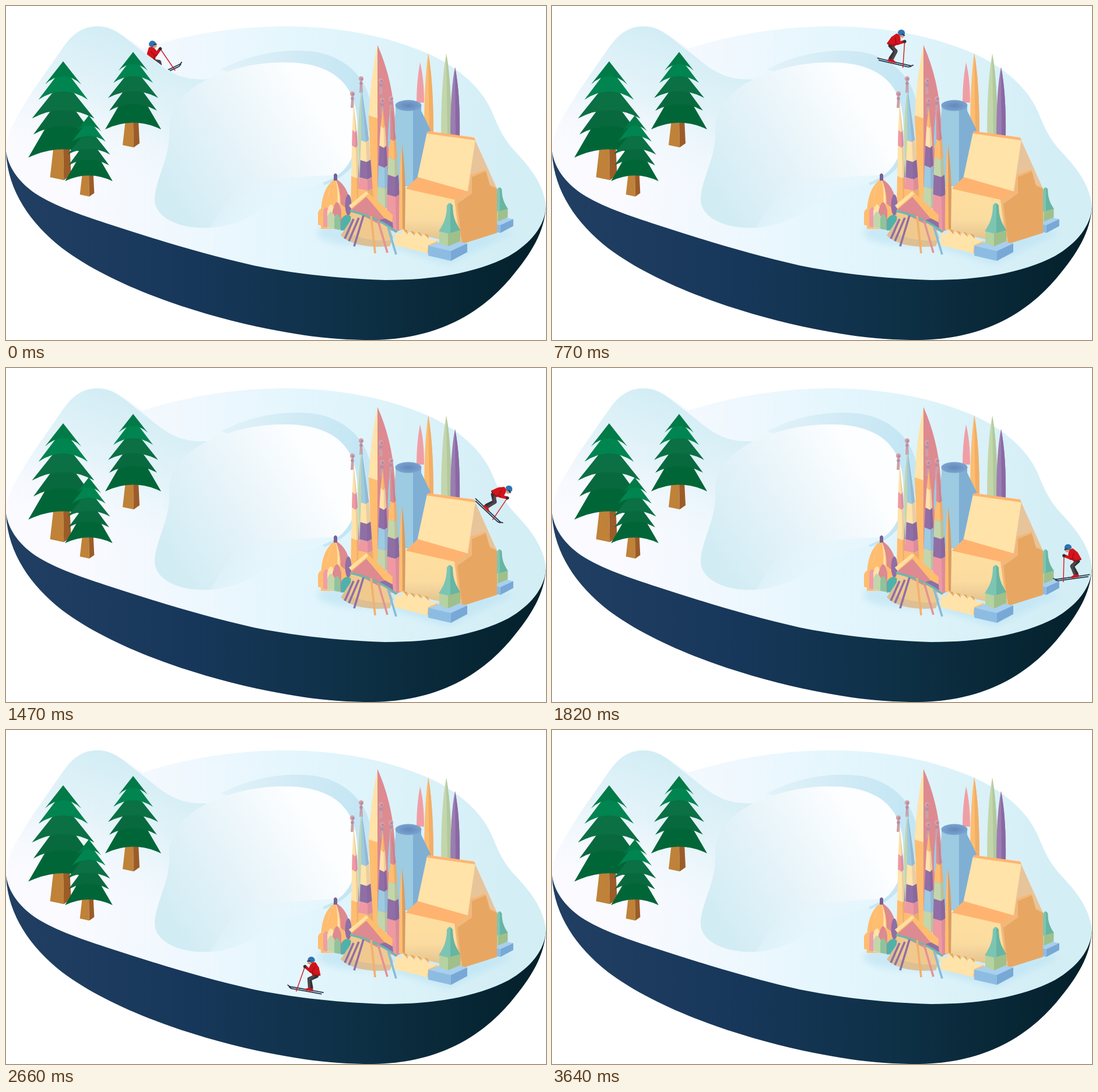
An HTML page that plays this animation: 926x574 px, repeating every 3940 ms.

```html
<!DOCTYPE html>
<html lang="en">
<head>
<meta charset="utf-8">
<title>Skier</title>
<style>
html, body { margin: 0; width: 100%; height: 100%; overflow: hidden; background: #fff; }
svg { display: block; width: 926px; height: 574px; }
.cream { fill: #ffe3a9 } .orange { fill: #ffbd70 } .amber { fill: #e7a763 } .pink { fill: #f09ea6 }
.rose { fill: #dd8a90 } .purple { fill: #8f6fa6 } .green { fill: #c3d6ab } .blue { fill: #9ccbe2 }
.steel { fill: #80afd4 } .teal { fill: #7cc5b2 } .tan { fill: #e8c49b }
.pole { fill: none; stroke-width: 3.6 }
</style>
</head>
<body>
<svg viewBox="0 0 926 574">
  <defs>
    <linearGradient id="side"><stop stop-color="#213f63"/><stop offset=".35" stop-color="#17375a"/><stop offset=".65" stop-color="#0e3045"/><stop offset="1" stop-color="#03202a"/></linearGradient>
    <linearGradient id="snow" gradientUnits="userSpaceOnUse" x1="120" y1="250" x2="860" y2="290"><stop stop-color="#fafaff"/><stop offset=".5" stop-color="#e4f6fd"/><stop offset="1" stop-color="#d4eef5"/></linearGradient>
    <linearGradient id="hill" gradientUnits="userSpaceOnUse" x1="225" y1="60" x2="140" y2="295"><stop stop-color="#d3edf5"/><stop offset=".45" stop-color="#e0f2f8" stop-opacity=".85"/><stop offset="1" stop-color="#f8faff" stop-opacity="0"/></linearGradient>
    <linearGradient id="ice" gradientUnits="userSpaceOnUse" x1="290" y1="340" x2="540" y2="180"><stop stop-color="#d2ecf4"/><stop offset=".45" stop-color="#e5f3f9"/><stop offset="1" stop-color="#fdfeff"/></linearGradient>
    <linearGradient id="iceEnd" gradientUnits="userSpaceOnUse" x1="400" y1="300" x2="445" y2="365"><stop stop-color="#e5f6fd" stop-opacity="0"/><stop offset="1" stop-color="#e5f6fd"/></linearGradient>
    <linearGradient id="rim" gradientUnits="userSpaceOnUse" x1="370" y1="110" x2="600" y2="150"><stop stop-color="#e2f2f9"/><stop offset=".6" stop-color="#cfeaf5"/><stop offset="1" stop-color="#c4e6f4"/></linearGradient>
    <linearGradient id="wall" x2="0" y2="1"><stop stop-color="#ffdf9f"/><stop offset=".55" stop-color="#fbdca0"/><stop offset="1" stop-color="#dfbe8c"/></linearGradient>
    <radialGradient id="cap"><stop stop-color="#6289b8"/><stop offset="1" stop-color="#7ba3d0"/></radialGradient>
    <filter id="soft" x="-20%" y="-40%" width="140%" height="180%"><feGaussianBlur stdDeviation="6"/></filter>
    <clipPath id="ridge"><path d="M232 0H926V574H345V126C305 128 290 118 270 104L232 76Z"/></clipPath>
  </defs>

  <path fill="url(#side)" d="M0 249C2 315 40 372 96 416C185 483 330 531 450 555C520 569 570 574 630 574C740 573 815 527 865 468C902 424 923 388 926 345L660 440 180 340Z"/>
  <path fill="url(#snow)" d="M0 250C0 215 24 182 46 146L98 71C118 42 138 34 160 35C186 36 203 52 234 73C320 46 400 35 484 35C575 36 650 52 712 77C768 99 815 138 833 181C845 209 851 226 875 252C904 283 923 311 926 345C924 378 900 408 862 430C810 457 740 471 650 471C560 468 490 459 425 446C340 427 260 402 180 376C135 361 85 345 50 322C20 301 4 276 0 250Z"/>
  <path fill="url(#hill)" d="M0 250C0 215 24 182 46 146L98 71C118 42 138 34 160 35C186 36 203 54 232 76C270 106 290 128 345 126L300 220 280 310H40Z"/>
  <path fill="url(#rim)" d="M368 109C420 82 475 73 524 78C585 85 625 130 626 178C626 235 603 288 545 308L480 140Z"/>
  <path fill="url(#ice)" d="M345 126C395 103 440 96 485 97C547 98 591 124 600 178C608 230 597 270 570 290C545 308 505 312 474 328C435 350 405 377 350 381C305 384 258 368 255 335C254 300 282 262 280 215C279 176 305 146 345 126Z"/>
  <path fill="url(#iceEnd)" d="M400 300L570 290C545 308 505 312 474 328C435 350 405 377 350 381Z"/>

  <g id="trees"></g>
  <ellipse cx="610" cy="390" rx="76" ry="22" fill="#c9e9f6" filter="url(#soft)"/>
  <path d="M650 412L850 385 872 390 760 444Z" fill="#c4e7f5" filter="url(#soft)"/>
  <g id="back" clip-path="url(#ridge)"></g>

  <g id="city">
    <path class="pink" d="M710 97Q704 130 704 166H717Q717 125 710 97Z"/>
    <path class="orange" d="M724 81Q717 130 717 220H733Q733 130 724 81Z"/>
    <path fill="#f2ae66" d="M724 81Q733 130 733 220H726Z"/>
    <path class="green" d="M755 82Q746 130 746 224H764Q764 130 755 82Z"/>
    <path fill="#b2c99d" d="M755 82Q764 130 764 224H757Z"/>
    <path fill="#9c7db3" d="M770 105Q762 145 762 225H778Q779 150 770 105Z"/>
    <path fill="#8a69a2" d="M770 105Q779 150 778 225H771Z"/>

    <path class="blue" d="M668 171V182L663 215 668 310H698V178Z"/>
    <path class="steel" d="M698 178L712 171V180L728 213 708 300 698 312Z"/>
    <ellipse cx="690" cy="171" rx="22.5" ry="9.5" fill="url(#cap)"/>

    <path class="rose" d="M637 67Q664 128 667 200V340H637Z"/>
    <path class="cream" d="M637 67Q625 125 622 188L637 193Z"/>
    <path class="orange" d="M622 188L637 193V345H628Z"/>
    <g id="towers"></g>
    <path class="green" d="M609 142Q603 200 604 236L606 308 609 230Z"/>
    <path class="blue" d="M659 178Q654 210 655 246L659 235Z"/>

    <path class="orange" d="M679 238Q674 270 674 384L681 386Z"/>
    <path fill="#d99c62" d="M679 238Q686 280 686 386H680Z"/>

    <use href="#statue" transform="translate(245 44) scale(.79)"/>
    <path class="tan" d="M803 227L842 314 820 390H780L790 315Z"/>
    <path class="cream" d="M722 217L805 229 791 322 705 297Z"/>
    <path fill="#ffb570" d="M724 215L803 226 805 231 721 219Z"/>
    <path fill="#ffb370" d="M706 294L793 319 770 335 685 314Z"/>
    <path fill="url(#wall)" d="M685 314L770 333 782 409 684 388Z"/>
    <path fill="#f3b878" d="M769 333L793 318 797 290 822 281 829 306 841 312 800 380 778 400Z"/>
    <path class="amber" d="M774 340L799 322V294L823 284 830 309 842 314V390L782 409Z"/>

    <path class="orange" d="M540 355C541 322 552 304 565 297C578 304 592 325 592 355V383H540Z"/>
    <path class="cream" d="M565 297Q547 320 552 352H572Q574 318 565 297Z"/>
    <path class="rose" d="M565 297C580 304 592 325 592 355L574 340Q574 315 565 297Z"/>
    <path class="orange" d="M565 297Q552 312 550 345L567 350Q571 320 565 297Z"/>
    <ellipse class="purple" cx="587" cy="342" rx="5.5" ry="18"/>
    <path fill="#786195" d="M562 300V290Q565 285 568 290V300Z"/>
    <path class="orange" d="M535 376V355Q540 342 546 355V379Z"/>
    <path class="pink" d="M544 379V352Q549 339 555 352V381Z"/>
    <path class="cream" d="M551 381V352Q557 330 564 352V383Z"/>
    <path class="rose" d="M560 382V352Q568 322 575 352V384Z"/>
    <path class="green" d="M551 380V362Q557 345 564 362V383Z"/>
    <path fill="#8fc39b" d="M563 383V365Q568 350 573 365V385Z"/>
    <path fill="#4fb2aa" d="M574 386V368Q582 354 592 362V384Z"/>

    <path fill="#dcbf94" d="M574 394C590 410 620 416 658 413L664 398 655 375 600 355Z"/>
    <path fill="#f0c98f" d="M592 352L655 378 660 403Q622 405 590 392Z"/>
    <path class="orange" d="M588 343L619 319 663 359 662 378Z"/>
    <path fill="#ffe0a0" d="M588 343L617 319 622 322 592 348Z"/>
    <path class="rose" d="M592 350L618 328 650 366 640 375Z"/>
    <path class="purple" d="M640 368L650 365 663 372 664 382Z"/>
    <path class="pole" stroke="#69b8ae" d="M590 352Q640 364 670 389"/>
    <path class="pole" stroke="#8f6fa6" d="M596 366L581 400M605 364L588 404M613 360L597 413"/>
    <path class="pole" stroke="#f2b06d" d="M626 361L633 425"/>
    <path class="pole" stroke="#e49294" d="M638 369L654 424"/>
    <path class="pole" stroke="#86bcd7" d="M655 380L669 427"/>

    <path class="cream" d="M668 389L678 392 680 383 688 385 690 394 692 386 700 388 702 396 704 388 711 390 714 398 716 391 724 393 726 401 739 404V413L722 425 666 411Z"/>
    <path class="amber" d="M680 383L688 385 689 393ZM692 386L700 388 701 395ZM704 388L711 390 713 397ZM716 391L724 393 725 400Z"/>
    <path class="orange" d="M724 411L740 404V414L722 425Z"/>

    <g id="statue">
      <path fill="#a8cfed" d="M724 412L757 401 791 408 763 421Z"/>
      <path fill="#8dbce3" d="M724 412L763 421V438L724 429Z"/>
      <path fill="#78a8d6" d="M763 421L791 408V423L763 438Z"/>
      <path fill="#b6d2a0" d="M743 386L758 390V413L743 407Z"/>
      <path fill="#9fc08b" d="M758 390L779 384V404L758 413Z"/>
      <path class="teal" d="M756 343Q761 334 766 343C766 364 772 374 779 385L758 391 742 387C751 374 756 362 756 343Z"/>
      <path fill="#67b5a2" d="M762 339L766 343C766 364 772 374 779 385L762 390Z"/>
    </g>
  </g>
  <g id="front"></g>

  <g id="skier" stroke-linecap="round" stroke-linejoin="round" fill="none">
    <path d="M-31 0L26 -1Q29 -1 31 -3M-28 3L22 2Q25 2 28 0" stroke="#27384a" stroke-width="1.8"/>
    <path d="M-26 .9H22" stroke="#91b4ce" stroke-width=".7"/>
    <path d="M-15 -26L-4 -19 -9 -5" stroke="#333136" stroke-width="7"/>
    <path d="M-10 -25L-3 -18 -6 -5" stroke="#4b474d" stroke-width="4.5"/>
    <path d="M-13 1V-3L-5 -4 1 -1V1Z" fill="#d3141b"/>
    <path d="M-17 -41L-10 -49 -3 -48 0 -38 -8 -26 -22 -28Z" fill="#d3141b"/>
    <path d="M-20 -28L-10 -27 -6 -34" stroke="#8e0f17" stroke-width="1.5"/>
    <path d="M-9 -43L-5 -32 5 -38" stroke="#d3141b" stroke-width="5"/>
    <path d="M-10 -41L-6 -31 -2 -32" stroke="#930f18" stroke-width="1.2"/>
    <path d="M7 -39L15 5" stroke="#d3212a" stroke-width="1.5"/>
    <circle cx="7" cy="-39" r="2.8" fill="#332f36"/>
    <circle cx="0" cy="-48" r="4" fill="#dc9a7c"/>
    <path d="M-8 -50A6 6 0 0 1 4 -53L4 -50 -3 -47Z" fill="#2e73b0"/>
    <path d="M0 -50L4 -49" stroke="#24354d" stroke-width="2"/>
  </g>
</svg>
<script>
const $ = id => document.getElementById(id);
const poly = (points, fill) => `<polygon points="${points.join(' ')}" fill="${fill}"/>`;

// Tiers: top, tip height, half width, colour
const TIERS = [
  [50, 133, 48, '#006638'], [45, 101, 41, '#08693e'], [25, 79, 43, '#0b7044'],
  [8, 53, 34, '#008450'], [0, 32, 25, '#007a47']
];
function tree(x, y, scale) {
  const tiers = TIERS.map(([top, tip, w, fill]) =>
    `<path d="M0 ${top}L${-w} ${tip}Q0 ${tip - 23} ${w} ${tip}Z" fill="${fill}"/>`).join('');
  return `<g transform="translate(${x} ${y}) scale(${scale})">
    ${poly([[-13, 116], [0, 116], [1, 164], [-18, 160]], '#bf8238')}
    ${poly([[0, 116], [9, 116], [11, 157], [1, 164]], '#9c5c28')}${tiers}</g>`;
}
$('trees').innerHTML = tree(218, 79, 1) + tree(98, 95, 1.245) + tree(142, 188, .85);

const INK = { c: '#ffe3a9', o: '#ffbd70', p: '#ef99a2', r: '#dd8a90', v: '#8f6fa6', g: '#c3d6ab', b: '#9ccbe2' };
function tower(ax, ay, left, right, base, bands) {
  const at = (x, y) => [ax + (x - ax) * Math.min(1, (y - ay) / (base - ay)) ** .6, y];
  const mid = (left + 2 * right) / 3;
  let out = '';
  bands.forEach(([y, ink], i) => {
    const end = i + 1 < bands.length ? bands[i + 1][0] : base;
    const dip = i ? 4 : 0;
    const a = at(left, y), b = at(mid, y + dip), c = at(right, y);
    const d = at(right, end), e = at(mid, end + 4), f = at(left, end);
    out += poly([a, b, c, d, e, f], INK[ink]);
    out += `<polygon points="${[b, c, d, e].join(' ')}" fill="#60416e" opacity=".13"/>`;
  });
  return out;
}
const knob = (x, y) => `<path d="M${x - 3} ${y + 24}L${x - 1.5} ${y}H${x + 1.5}L${x + 3} ${y + 24}Z" fill="#c9a0a8"/>
  <circle cx="${x}" cy="${y}" r="4.2" fill="#d8a0a4"/><circle cx="${x + 1}" cy="${y + 1}" r="2.2" fill="#a78fae"/>
  <circle cx="${x}" cy="${y + 8}" r="2.8" fill="#b58fa5"/>`;
$('towers').innerHTML =
  knob(643, 128) + knob(594, 151) + knob(609, 125) + knob(645, 162) + knob(660, 159) +
  tower(596, 165, 591, 608, 350, [[165, 'c'], [213, 'p'], [240, 'c'], [292, 'o']]) +
  tower(610, 142, 603, 631, 350, [[142, 'b'], [230, 'c'], [264, 'v'], [294, 'p'], [314, 'o']]) +
  tower(646, 175, 636, 657, 345, [[175, 'o'], [206, 'c'], [240, 'v'], [274, 'b'], [310, 'g']]) +
  tower(661, 172, 652, 678, 384, [[172, 'r'], [228, 'o'], [260, 'g'], [290, 'v'], [324, 'p']]);

// Each track: step, x, y, tilt
const OUT = [[0, 274, 112, -24], [7, 479, 66, -2], [16, 719, 161, 34], [20, 808, 228, 42], [24, 882, 304, 52]];
const HOME = [[25, 899, 334, -30], [26, 891, 360, -9], [29.5, 800, 437, -20], [33, 700, 461, 1],
  [40, 437, 436, 11], [43, 324, 409.5, 12.5], [48, 126, 352, 20], [51, 30, 293, 43]];
const STEP = 70, LOOP = 3940, LAST = 51;

// Cubic interpolation through the keys of a track
function sample(track, k) {
  let i = 0;
  while (i < track.length - 2 && k >= track[i + 1][0]) i++;
  const a = track[i], b = track[i + 1], h = b[0] - a[0], u = (k - a[0]) / h;
  const slope = (j, c) => {
    const p = track[Math.max(0, j - 1)], q = track[Math.min(track.length - 1, j + 1)];
    return (q[c] - p[c]) / (q[0] - p[0]);
  };
  return [1, 2, 3].map(c => {
    const m = slope(i, c) * h, n = slope(i + 1, c) * h, d = b[c] - a[c];
    return a[c] + u * (m + u * (3 * d - 2 * m - n + u * (m + n - 2 * d)));
  });
}

const skier = $('skier'), back = $('back'), front = $('front');
function draw(time) {
  const k = Math.floor(time % LOOP / STEP);
  skier.style.display = k > LAST ? 'none' : '';
  if (k > LAST) return;
  const home = k >= HOME[0][0], layer = home ? front : back;
  if (skier.parentNode !== layer) layer.append(skier);
  const [x, y, tilt] = sample(home ? HOME : OUT, k);
  skier.setAttribute('transform', `translate(${x} ${y}) rotate(${tilt}) scale(${home ? -1 : 1} 1)`);
}
const start = performance.now();
function tick() {
  draw(performance.now() - start);
  requestAnimationFrame(tick);
}
tick();
</script>
</body>
</html>
```
